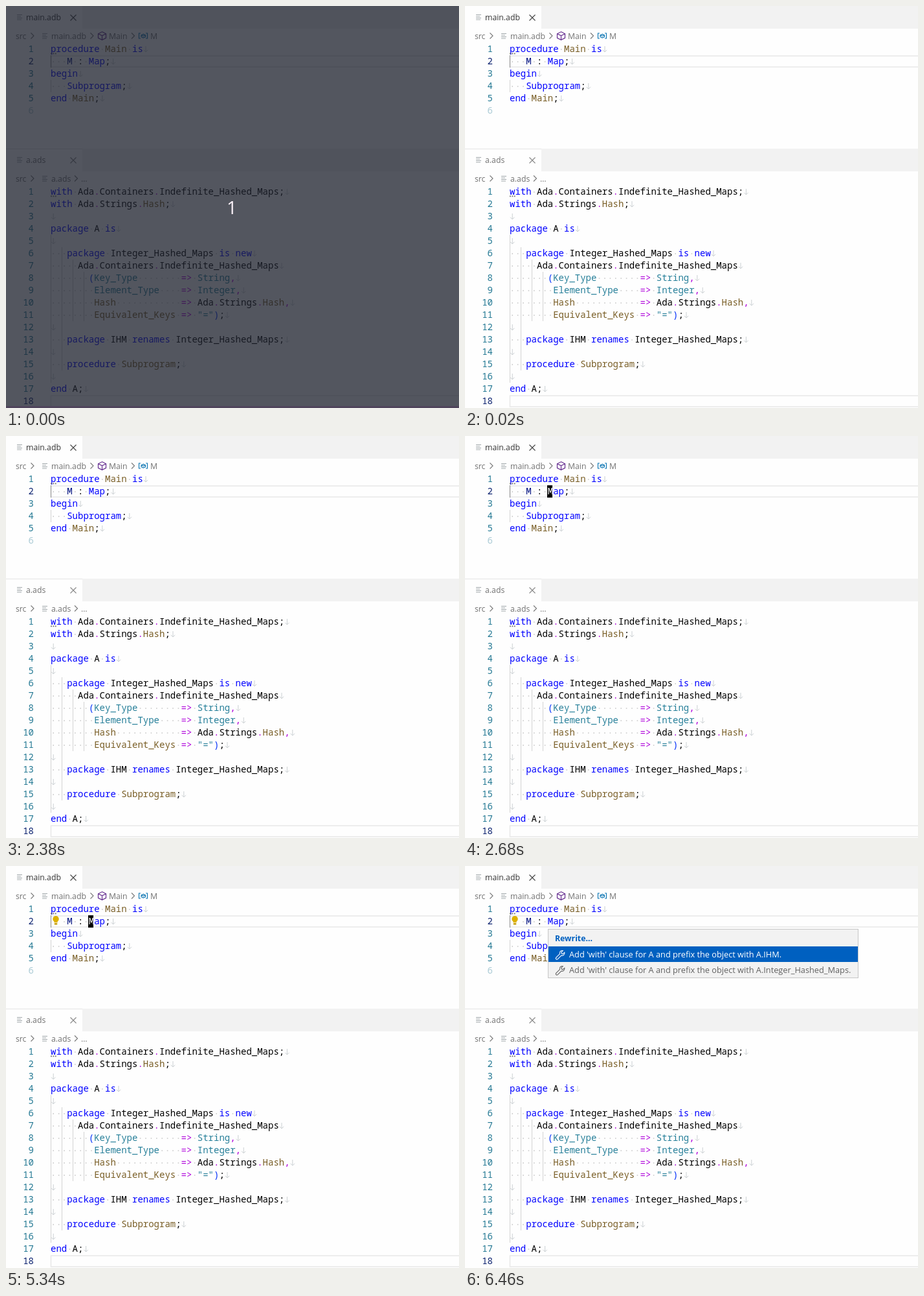
An HTML page for the animation above (8 s loop, 700 px wide and 620 px high).

```html
<!DOCTYPE html>
<html lang="en">
<head>
<meta charset="utf-8">
<title>Ada quick fix</title>
<style>
  html, body { margin: 0; width: 700px; height: 620px; overflow: hidden; background: #fefefe; }
  svg { display: block; }
  text { white-space: pre; }
  .code { font: 14px "Noto Sans Mono", "DejaVu Sans Mono", monospace; font-variant-ligatures: none; }
  .ui { font: 12.25px "Open Sans", "Noto Sans", sans-serif; }
  .item { font-size: 12.75px; }
  .line { fill: none; stroke-width: 1; }
</style>
</head>
<body>
<svg id="stage" width="700" height="620" viewBox="0 0 700 620"></svg>
<script>
const LOOP = 8000, LEFT = 69, CHAR = 8.4, ROW = 19;
const stage = document.getElementById('stage');

const COLORS = {
  k: '#0000ff', // keyword
  f: '#795e26', // subprogram
  t: '#267f99', // type
  v: '#001080', // variable
  o: '#af00db', // operator
  b: '#0431fa', // bracket
  n: '#000000'
};

// {class text} marks a coloured token.
const mainCode = [
  '{k procedure} {f Main} {k is}',
  '   {v M} : {k Map};',
  '{k begin}',
  '   {k Subprogram};',
  '{k end} {f Main};'
];
const specCode = [
  '{k with} Ada{o .}Containers{o .}Indefinite_Hashed_Maps;',
  '{k with} Ada{o .}Strings{o .}{f Hash};',
  '',
  '{k package} A {k is}',
  '',
  '   {k package} Integer_Hashed_Maps {k is} {k new}',
  '     Ada{o .}Containers{o .}Indefinite_Hashed_Maps',
  '       {b (}{t Key_Type}        {o =>} {t String}{o ,}',
  '        {t Element_Type}    {o =>} {t Integer}{o ,}',
  '        {f Hash}            {o =>} Ada{o .}Strings{o .}{f Hash}{o ,}',
  '        {f Equivalent_Keys} {o =>} {t "="}{b )};',
  '',
  '   {k package} IHM {k renames} Integer_Hashed_Maps;',
  '',
  '   {k procedure} {f Subprogram};',
  '',
  '{k end} A;'
];

function add(parent, tag, attrs, content) {
  const el = document.createElementNS('http://www.w3.org/2000/svg', tag);
  for (const name in attrs) el.setAttribute(name, attrs[name]);
  if (content !== undefined) el.textContent = content;
  parent.appendChild(el);
  return el;
}
const rect = (p, x, y, width, height, fill) => add(p, 'rect', { x, y, width, height, fill });
const path = (p, d, stroke, width = 1) =>
  add(p, 'path', { d, stroke, class: 'line', style: `stroke-width:${width}` });
const label = (p, x, y, fill, str, cls = 'ui') => add(p, 'text', { x, y, fill, class: cls }, str);
const colX = col => LEFT + col * CHAR;

function codeLine(source, top) {
  let col = 0, marks = '';
  const addMarks = str => {
    [...str].forEach((ch, i) => {
      if (ch === ' ') marks += `M${colX(col + i + 0.5) - 0.8} ${top + 10}h1.6`;
    });
  };
  for (const [, cls, token, plain] of source.matchAll(/\{(\w) ([^}]*)\}|([^{]+)/g)) {
    const str = token || plain;
    if (str.trim()) label(stage, colX(col), top + 14, COLORS[cls || 'n'], str, 'code');
    addMarks(str);
    col += str.length;
  }
  if (marks) path(stage, marks, '#c6c6c6', 1.6);
  const x = colX(col + 0.5);
  path(stage, `M${x} ${top + 5}v9m-3.2 -3.2l3.2 3.2l3.2 -3.2`, '#cbd0d3');
}

function gutter(n, top, fill) {
  const el = label(stage, 43, top + 14, fill, n, 'code');
  el.setAttribute('text-anchor', 'end');
}

function currentLine(top) {
  add(stage, 'rect', {
    x: LEFT + 0.5, y: top + 1, width: 640, height: ROW - 2,
    fill: 'none', stroke: '#e9e9e9', 'stroke-width': 1.6
  });
}

const guide = (x, y1, y2, color = '#d3d3d3') => path(stage, `M${x + 0.5} ${y1}V${y2}`, color);
const chevron = (x, y) => path(stage, `M${x} ${y - 4.5}l4.5 4.5l-4.5 4.5`, '#777', 1.1);
const fileIcon = (x, y) =>
  path(stage, `M${x} ${y - 3.5}h8M${x} ${y - 1}h6M${x} ${y + 1.5}h8M${x} ${y + 4}h7`, '#a2a9ac');

function editor(top, name, active) {
  rect(stage, 118, top, 582, 35, '#f2f2f2');
  const ink = active ? '#333' : '#707070';
  fileIcon(17, top + 17);
  label(stage, 31, top + 22, ink, name);
  path(stage, `M99.5 ${top + 13.5}l9 9m0 -9l-9 9`, active ? '#444' : '#888', 1.1);
  const y = top + 46;
  label(stage, 15, y + 5, '#717171', 'src');
  chevron(38.5, y);
  fileIcon(56, y);
  label(stage, 70, y + 5, '#717171', name);
}

function symbolPath() {
  chevron(130.5, 46);
  path(stage, 'M148.5 39.8l6 3v6.6l-6 3l-6 -3v-6.6zM142.5 42.8l6 3l6 -3M148.5 45.8v6.6', '#652d90', 1.2);
  label(stage, 159, 51, '#717171', 'Main');
  chevron(194, 46);
  path(stage, 'M208 42h-2.5v8h2.5M216 42h2.500v8h-2.500M209 45l3.500 -1.500l3 1.500v2.500l-3.500 1.500l-3 -1.500zM209 45l3 1.200l3.500 -1.200', '#1279b5', 1.2);
  label(stage, 223, 51, '#717171', 'M');
}

function hint(y) {
  for (let i = 0; i < 3; i++) rect(stage, 69 + i * 3.4, y, 1.8, 1.8, '#6c6c6c');
}

function drawEditors() {
  rect(stage, 0, 0, 700, 620, '#fefefe');
  editor(0, 'main.adb', true);
  symbolPath();
  currentLine(76);
  guide(69, 76, 95, '#8f8f8f');
  guide(69, 114, 133);
  for (let n = 1; n <= 6; n++)
    gutter(n, 57 + (n - 1) * ROW, n === 2 ? '#0b216f' : n === 6 ? '#abcbd5' : '#237893');
  mainCode.forEach((line, i) => codeLine(line, 57 + i * ROW));
  hint(72.5);

  rect(stage, 0, 220, 700, 1, '#e5e5e5');
  editor(220, 'a.ads', false);
  chevron(106, 266);
  label(stage, 116, 271, '#717171', '…');
  currentLine(600);
  guide(69, 353, 581);
  guide(86, 372, 562);
  guide(103, 391, 486);
  guide(120, 410, 486);
  for (let n = 1; n <= 18; n++) gutter(n, 277 + (n - 1) * ROW, n === 18 ? '#0b216f' : '#237893');
  specCode.forEach((line, i) => codeLine(line, 277 + i * ROW));
  hint(292.5);
}

const group = () => add(stage, 'g', {});

function blockCursor(col, ch) {
  const g = group();
  rect(g, Math.floor(colX(col)) + (col === 7 ? 1 : 0) - (col === 7 ? 1 : 0), 76, 8, ROW, '#000');
  label(g, colX(col), 90, '#fff', ch, 'code');
  return g;
}

function lightBulb() {
  const g = group();
  rect(g, 70, 78, 14, 15, '#fefefe');
  add(g, 'path', {
    d: 'M77 77a4.700 4.700 0 0 0 -2.600 8.600v1.600h5.200v-1.600a4.700 4.700 0 0 0 -2.600 -8.600z',
    fill: '#ddb100'
  });
  rect(g, 74.8, 88, 4.4, 2.6, '#c9a316');
  return g;
}

function wrench(g, y, color) {
  path(g, `M140.800 ${y + 5.200}l5.600 -5.600c-.8 -3 1.800 -5.800 4.800 -5l-2.400 2.500l.5 2l2 .5l2.500 -2.400c.8 3 -2 5.600 -5 4.800l-5.600 5.600c-1.800 1.400 -3.800 -.6 -2.400 -2.400z`, color, 1.1);
}

function menu() {
  const g = group();
  rect(g, 128, 97, 480, 76, '#c6c6c6');
  rect(g, 129, 98, 478, 74, '#f2f2f2');
  label(g, 139, 116, '#0060c0', 'Rewrite...').setAttribute('font-weight', '700');
  g.lastChild.style.fontWeight = 700;
  rect(g, 129, 124, 478, 24, '#0060c0');
  ['IHM', 'Integer_Hashed_Maps'].forEach((name, i) => {
    const color = i ? '#616161' : '#fff';
    wrench(g, 136 + i * 24, color);
    label(g, 161, 141 + i * 24, color,
      `Add 'with' clause for A and prefix the object with A.${name}.`, 'ui item');
  });
  return g;
}

function dimmer() {
  const g = group();
  rect(g, 0, 0, 700, 620, 'rgba(29,33,45,.76)');
  rect(g, 0, 617, 700, 3, '#50455c');
  const digit = label(g, 349, 321, '#fdf3fa', '1');
  digit.setAttribute('text-anchor', 'middle');
  digit.style.fontSize = '28px';
  return g;
}

// Shows an element only within the given [start, end] spans.
function show(el, ...spans) {
  const frames = [{ offset: 0, opacity: 0, easing: 'steps(1)' }];
  for (const [start, end] of spans) {
    if (start === 0) frames[0].opacity = 1;
    else frames.push({ offset: start / LOOP, opacity: 1, easing: 'steps(1)' });
    if (end < LOOP) frames.push({ offset: end / LOOP, opacity: 0, easing: 'steps(1)' });
  }
  frames.push({ offset: 1, opacity: frames[frames.length - 1].opacity });
  el.animate(frames, { duration: LOOP, iterations: Infinity });
}

drawEditors();
show(blockCursor(10, ';'), [980, 2380]);
show(blockCursor(7, 'M'), [2680, 3920], [5340, 6460]);
show(lightBulb(), [3620, LOOP]);
show(menu(), [6460, LOOP]);
show(dimmer(), [0, 20]);
</script>
</body>
</html>
```
